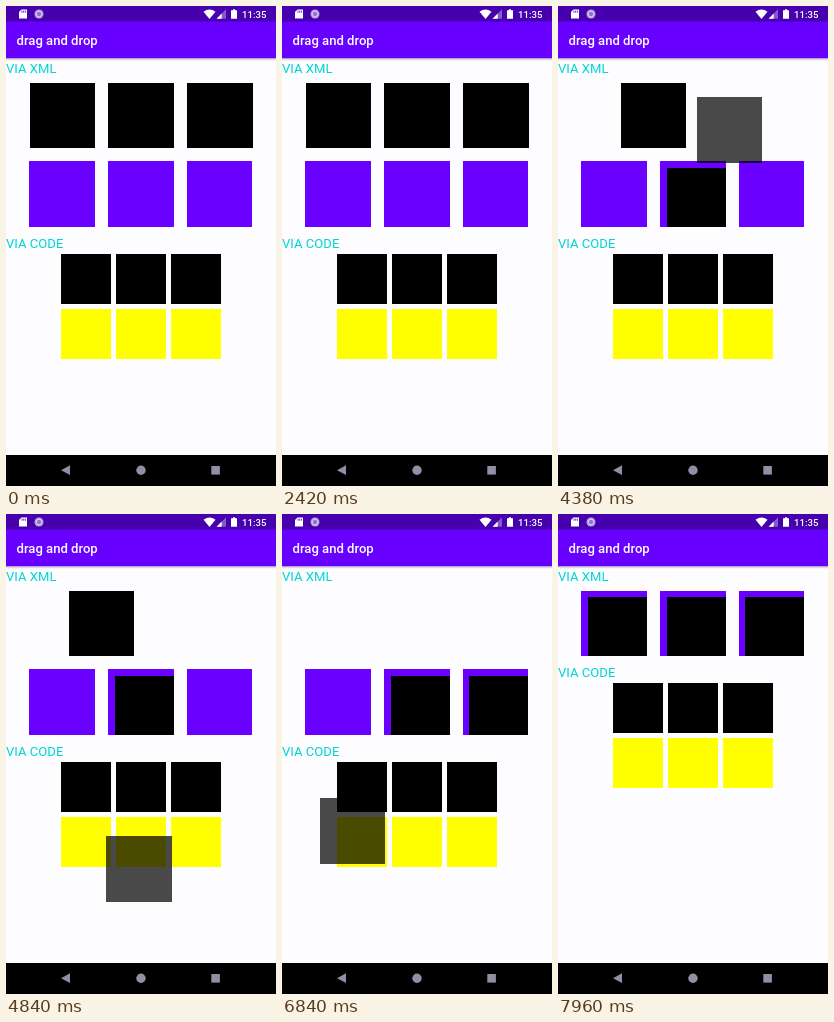
Write an HTML page that moves like this. It is 270 by 480 pixels and loops after 8 s.

```html
<!DOCTYPE html>
<html lang="en">
<head>
<meta charset="utf-8">
<title>drag and drop</title>
<style>
  html, body { margin: 0; height: 100%; overflow: hidden; background: #fdfdff; }
  svg { display: block; width: 100vw; height: 100vh; font-family: Roboto, sans-serif; }
  .label { font-size: 13.1px; fill: #02d4d6; }
  .bold { font-weight: 500; fill: #fff; }
  .tile { shape-rendering: crispEdges; }
</style>
</head>
<body>
<svg viewBox="0 0 270 480">
  <defs>
    <linearGradient id="shade" x2="0" y2="1">
      <stop stop-color="#000" stop-opacity=".25"/>
      <stop offset="1" stop-color="#000" stop-opacity="0"/>
    </linearGradient>
  </defs>
  <rect width="270" height="480" fill="#fdfdff"/>
  <rect y="52" width="270" height="3" fill="url(#shade)"/>
  <rect y="15" width="270" height="37.2" fill="#6700ff"/>
  <rect width="270" height="15.5" fill="#4700ad"/>
  <text class="bold" x="10.5" y="39.3" font-size="13.1">drag and drop</text>

  <g fill="#fff">
    <path d="M15.5 3.5H21V12.5H13V6Z"/>
    <path d="M16 4.7v2M17.7 4.7v2M19.4 4.7v2" stroke="#4700ad" stroke-width=".8"/>
    <circle cx="33" cy="8" r="4.5" fill="#b8a5e2"/>
    <circle cx="33" cy="8" r="2.7" fill="#8e72cf" stroke="#e2d9f5" stroke-width=".8"/>
    <path d="M197.5 5.7Q203.5 1.3 209.5 5.7L203.5 13Z"/>
    <path d="M220 3.3V12.7H210.6Z" fill-opacity=".35"/>
    <path d="M215.7 7.6V12.7H210.6Z"/>
    <path d="M227 3.2h2v1h2v8.6h-6V4.2h2Z"/>
  </g>
  <text class="bold" x="236" y="11.5" font-size="9.6">11:35</text>

  <text class="label" y="66.5">VIA XML</text>
  <g id="slots" class="tile" fill="#6a00ff"></g>
  <g id="row" class="tile"></g>
  <g id="code">
    <text class="label" y="242">VIA CODE</text>
    <g id="small" class="tile"></g>
  </g>
  <rect id="ghost" class="tile" width="65.5" height="65.5" fill-opacity=".71"/>

  <rect y="449" width="270" height="31"/>
  <g fill="#918ea5">
    <path d="M55 464.2L64 459.3V469.1Z"/>
    <circle cx="135" cy="464.2" r="4.7"/>
    <rect x="205.3" y="460" width="8.6" height="8.6"/>
  </g>
</svg>
<script>
const LOOP = 8000, SIZE = 65.5, PITCH = 78.75, TOP = 76.8, SHIFT = 78.6, INSET = 6.5;
const get = id => document.getElementById(id);

// Each drag: picked tile, its target slot, and the ghost's path as [ms, x, y].
const drags = [
  { tile: 0, slot: 1, path: [[2600, 23, 77], [2950, 32, 118], [3250, 62, 148], [3540, 94, 155], [3840, 101, 157], [4000, 101, 157]] },
  { tile: 2, slot: 2, path: [[4320, 141, 77], [4560, 122, 200], [4840, 100, 322], [5200, 130, 290], [5590, 162, 181], [5900, 180, 157]] },
  { tile: 1, slot: 0, path: [[6500, 102, 77], [6680, 74, 190], [6840, 38, 284], [7150, 28, 220], [7450, 24, 158]] }
];
const startOf = d => d.path[0][0];
const endOf = d => d.path[d.path.length - 1][0];

function rect(parent, size, x, y, fill) {
  const r = document.createElementNS("http://www.w3.org/2000/svg", "rect");
  const attrs = { width: size, height: size, x, y };
  if (fill) attrs.fill = fill;
  for (const k in attrs) r.setAttribute(k, attrs[k]);
  return parent.appendChild(r);
}
const show = (el, on) => el.setAttribute("visibility", on ? "visible" : "hidden");
const move = (el, x, y) => el.setAttribute("transform", `translate(${x} ${y})`);

const tiles = [], filled = [];
for (let i = 0; i < 3; i++) {
  const x = 23.4 + i * PITCH, y = TOP + SHIFT;
  rect(get("slots"), SIZE, x, y);
  filled.push(rect(get("slots"), SIZE - INSET, x + INSET, y + INSET, "#000"));
  tiles.push(rect(get("row"), SIZE, 0, TOP));
  rect(get("small"), 50, 55 + i * 55, 248, "#000");
  rect(get("small"), 50, 55 + i * 55, 303, "#ff0");
}

// Smooth curve through the path points, at rest on both ends.
function along(path, t) {
  const n = path.length - 1;
  let i = 0;
  while (i < n - 1 && t > path[i + 1][0]) i++;
  const a = path[i], b = path[i + 1], span = b[0] - a[0], u = (t - a[0]) / span;
  const slope = (k, c) => k === 0 || k === n ? 0 :
    (path[k + 1][c] - path[k - 1][c]) / (path[k + 1][0] - path[k - 1][0]);
  return [1, 2].map(c => {
    const e = u * u * (3 - 2 * u);
    return a[c] + (b[c] - a[c]) * e + span * u * (1 - u) *
      (slope(i, c) * (1 - u) - slope(i + 1, c) * u);
  });
}

function draw(t) {
  const done = drags.filter(d => t >= endOf(d));
  const active = drags.find(d => t >= startOf(d) && t < endOf(d));
  const left = [0, 1, 2].filter(i => !done.some(d => d.tile === i));

  tiles.forEach((tile, i) => {
    const place = left.indexOf(i);
    show(tile, place >= 0 && !(active && active.tile === i));
    tile.setAttribute("x", 135 - SIZE / 2 + (place - (left.length - 1) / 2) * PITCH);
  });
  filled.forEach((f, i) => show(f, done.some(d => d.slot === i)));

  const lift = left.length ? 0 : -SHIFT;
  move(get("slots"), 0, lift);
  move(get("code"), 0, lift);

  show(get("ghost"), active);
  if (active) move(get("ghost"), ...along(active.path, t));
}

const began = performance.now();
function tick() {
  draw((performance.now() - began) % LOOP);
  requestAnimationFrame(tick);
}
tick();
</script>
</body>
</html>
```
